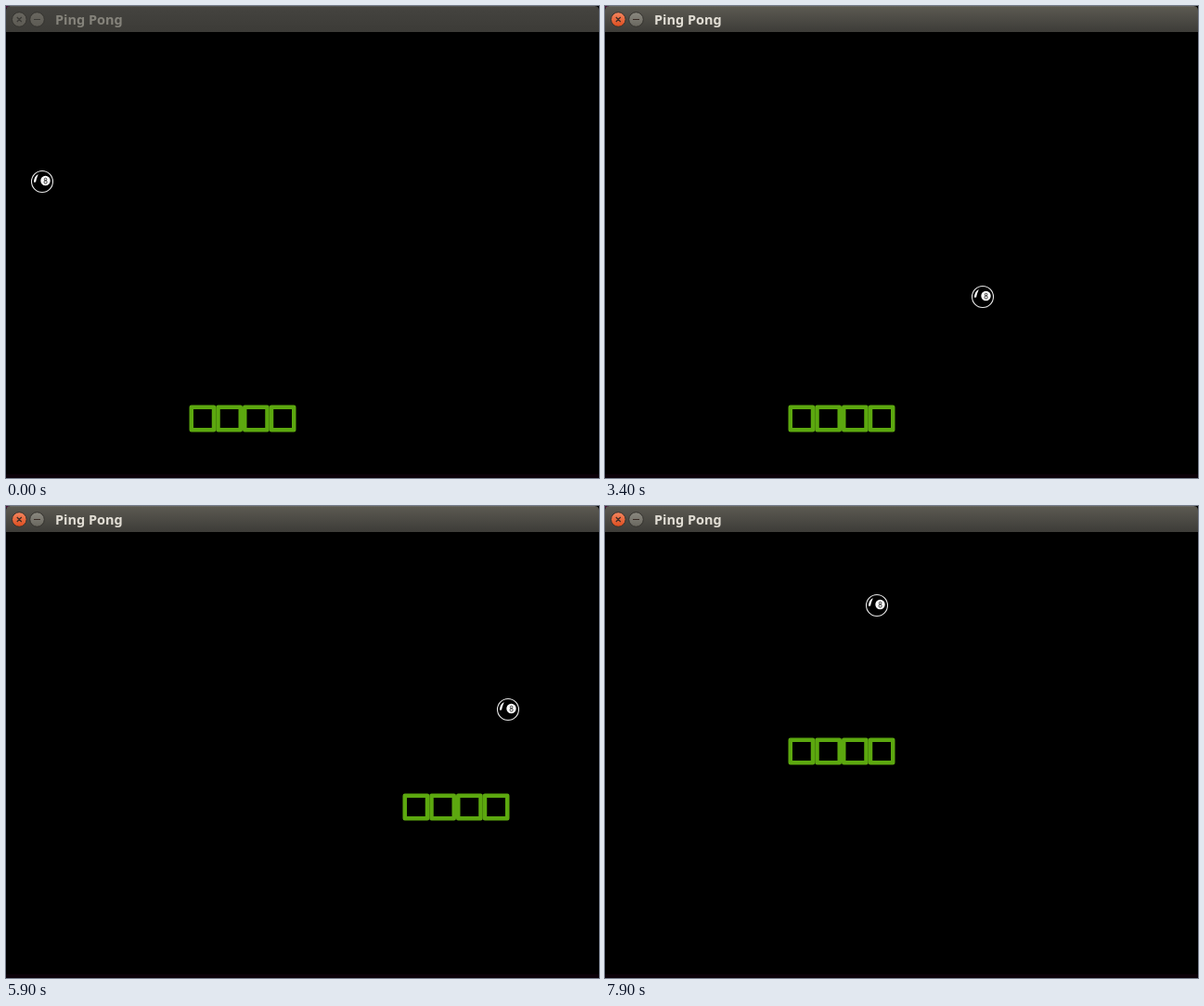
These frames come from a looping animation (639 by 508 pixels, 8 s). An HTML page:

```html
<!DOCTYPE html>
<html lang="en">
<head>
<meta charset="utf-8">
<title>Ping Pong</title>
<style>
  html, body { margin: 0; width: 100%; height: 100%; overflow: hidden; background: #000; }
  svg { display: block; width: 639px; height: 508px; }
  .title { font: 700 14.5px "Noto Sans", "Open Sans", sans-serif; }
  .blurred { --top: #454440; --bottom: #3c3b37; --text: #85837b; --edge: #33322e;
             --close: #68665f; --closeLow: #5d5b54; --min: #68665f; --minLow: #5d5b54; --glyph: #3b3a36; }
  .focused { --top: #5c5a52; --bottom: #3d3c38; --text: #e2ded5; --edge: #33312d;
             --close: #f4865f; --closeLow: #dc4d1f; --min: #8b8980; --minLow: #68665e; --glyph: #3a2c26; }
  .bar .a { stop-color: var(--top); }
  .bar .b { stop-color: var(--bottom); }
  .bar .c { stop-color: var(--close); }
  .bar .d { stop-color: var(--closeLow); }
  .bar .e { stop-color: var(--min); }
  .bar .f { stop-color: var(--minLow); }
</style>
</head>
<body>
<svg viewBox="0 0 639 508">
  <rect width="639" height="508"/>
  <rect y="504" width="639" height="4" fill="#0b0108"/>

  <g id="paddle" fill="none" stroke="#5ca80f" stroke-width="4.5" stroke-linejoin="round"></g>

  <g id="ball">
    <circle r="11.5" stroke="#e8e8e8" stroke-width="1.1"/>
    <path d="M-9 .8C-9-3-7.500-6.500-4.200-7.800C-5.500-5-6.300-3-6.900.6Z" fill="#fff"/>
    <circle cx="3.500" cy="-1" r="5.200" fill="#fff"/>
    <g fill="none" stroke="#222" stroke-width=".9">
      <circle cx="3.600" cy="-2.500" r="1.300"/>
      <circle cx="3.600" cy=".5" r="1.600"/>
    </g>
  </g>

  <g id="bar" class="bar blurred">
    <defs>
      <linearGradient id="barFill" x2="0" y2="1"><stop class="a"/><stop class="b" offset="1"/></linearGradient>
      <linearGradient id="closeFill" x2="0" y2="1"><stop class="c"/><stop class="d" offset="1"/></linearGradient>
      <linearGradient id="minFill" x2="0" y2="1"><stop class="e"/><stop class="f" offset="1"/></linearGradient>
    </defs>
    <rect width="639" height="8" fill="#000"/>
    <rect width="3" height="2" fill="#4a1238"/>
    <path d="M0 28V5Q0 0 5 0H634Q639 0 639 5V28Z" fill="url(#barFill)"/>
    <path d="M4 .5H635" stroke="#fff" stroke-opacity=".08"/>
    <g stroke="var(--edge)">
      <circle cx="14.300" cy="14.500" r="7.800" fill="url(#closeFill)"/>
      <circle cx="33.500" cy="14.500" r="7.800" fill="url(#minFill)"/>
    </g>
    <path d="M11.800 12L16.800 17M16.800 12L11.800 17M30 14.500H37" stroke="var(--glyph)" stroke-width="1.200"/>
    <text class="title" x="53" y="20" fill="var(--text)">Ping Pong</text>
  </g>
</svg>
<script>
  const LOOP = 8000, STEP = 100, FOCUS_AT = 3100;
  const $ = id => document.getElementById(id);
  const paddle = $("paddle"), ball = $("ball"), bar = $("bar");

  // [time, distance travelled along each axis]
  const travel = [[0, 0], [900, 114], [1400, 176], [1800, 222], [2700, 336], [3400, 424],
    [3600, 444], [4400, 544], [5400, 670], [6300, 778], [6600, 816], [7200, 892], [7900, 978]];

  // [time, paddle offset]
  const paddleX = [[0, 0], [3680, 0], [4200, 320], [5000, 320], [5145, 230],
    [6400, 230], [6600, 110], [6633, 90], [7450, 90], [7595, 0], [LOOP, 0]];
  const paddleY = [[0, 0], [5700, 0], [5990, -180], [LOOP, -180]];

  function at(keys, t) {
    const i = keys.findIndex(k => k[0] > t);
    if (i < 0) return keys[keys.length - 1][1];
    const [t0, v0] = keys[i - 1], [t1, v1] = keys[i];
    return v0 + (v1 - v0) * (t - t0) / (t1 - t0);
  }

  const snap = (v, unit) => Math.round(v / unit) * unit;

  // Position on a straight run that reflects between two walls
  function bounce(pos, low, high) {
    const span = high - low;
    const p = (((pos - low) % (2 * span)) + 2 * span) % (2 * span);
    return low + (p > span ? 2 * span - p : p);
  }

  const move = (el, x, y) => el.setAttribute("transform", `translate(${x} ${y})`);

  for (let i = 0; i < 4; i++) {
    const cell = document.createElementNS("http://www.w3.org/2000/svg", "rect");
    const box = { x: 199.75 + 28.75 * i, y: 431.75, width: 24.25, height: 24.5 };
    for (const name in box) cell.setAttribute(name, box[name]);
    paddle.append(cell);
  }

  function draw(now) {
    const t = Math.floor((now % LOOP) / STEP) * STEP;
    const d = snap(at(travel, t), 2);
    move(ball, bounce(39 - d, 11, 627), bounce(189 - d, 39, 419));
    move(paddle, snap(at(paddleX, t), 10), snap(at(paddleY, t), 10));
    bar.setAttribute("class", t < FOCUS_AT ? "bar blurred" : "bar focused");
  }

  const start = performance.now();
  function tick() {
    draw(performance.now() - start);
    requestAnimationFrame(tick);
  }
  tick();
</script>
</body>
</html>
```
